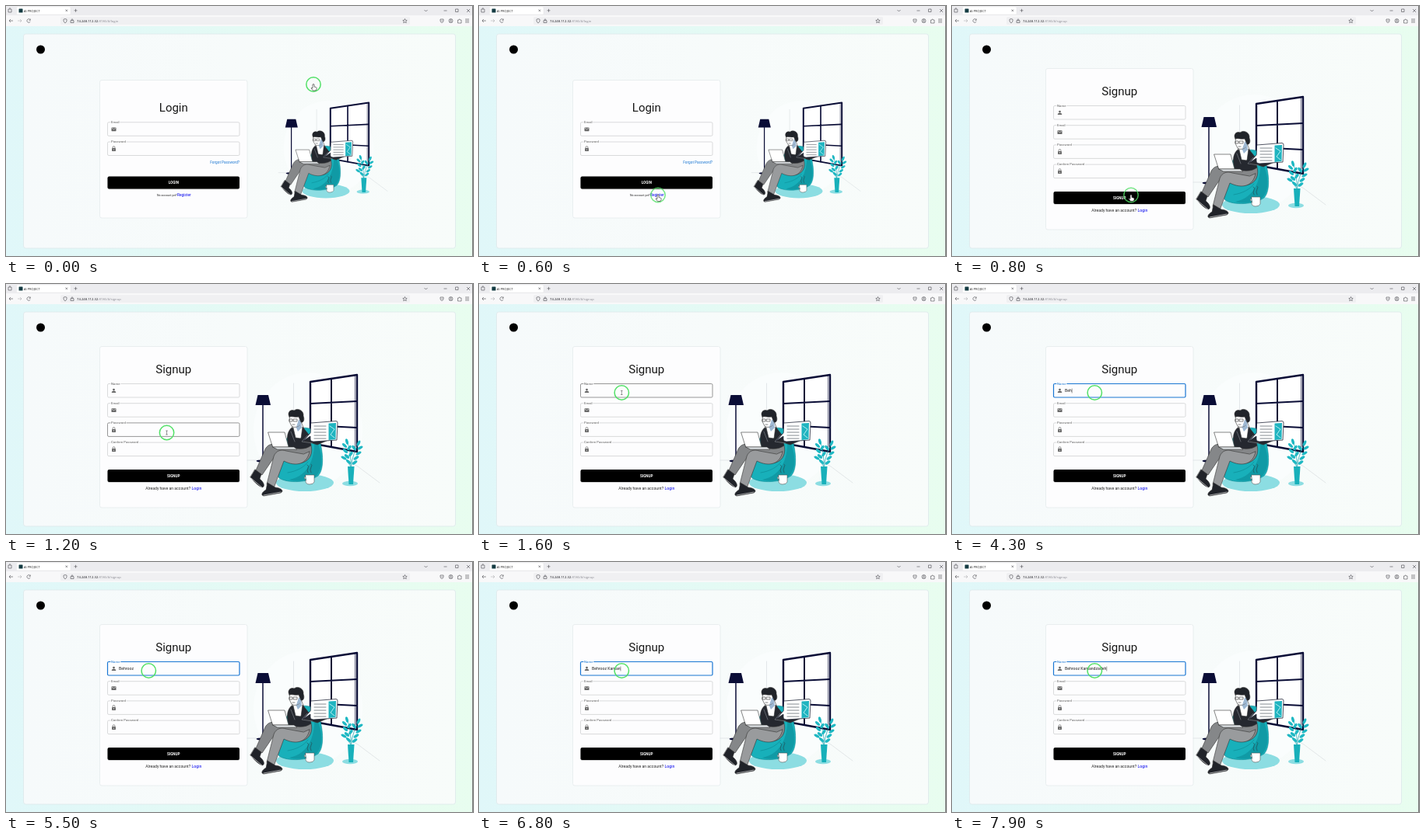
Write an HTML page that moves like this. It is 600x322 px and loops after 8000 ms.

```html
<!DOCTYPE html>
<html lang="en">
<head>
<meta charset="utf-8">
<title>Signup</title>
<style>
  html, body { margin: 0; height: 100%; overflow: hidden; }
  svg { display: block; width: 100vw; height: 100vh; }
  text { font-family: Roboto, sans-serif; white-space: pre; }
  .chrome text { font-family: "Open Sans", sans-serif; }
  .icon { fill: none; stroke: #55555c; stroke-width: .65; }
  .label { font-size: 4.3px; fill: #5c5c5c; stroke: #fdfdfe; stroke-width: 2px; paint-order: stroke; }
  .art { stroke-linejoin: round; stroke-linecap: round; }
</style>
</head>
<body>
<svg viewBox="0 0 600 322">
  <defs>
    <linearGradient id="sky"><stop stop-color="#e0f7f9"/><stop offset="1" stop-color="#e8fdef"/></linearGradient>
    <linearGradient id="panel"><stop stop-color="#f6fafb"/><stop offset="1" stop-color="#f8fcfa"/></linearGradient>

    <g id="mail"><rect x="-3" y="-2.400" width="6" height="4.800" rx=".6" fill="#666"/><path d="M-2.400-1.500L0 .1 2.400-1.500" fill="none" stroke="#fff" stroke-width=".6"/></g>
    <g id="lock"><rect x="-2.400" y="-1" width="4.800" height="4" rx=".5" fill="#666"/><path d="M-1.400-1v-1a1.400 1.400 0 0 1 2.800 0v1" fill="none" stroke="#666" stroke-width=".7"/><circle cy="1" r=".6" fill="#fff"/></g>
    <g id="person" fill="#666"><circle cy="-1.400" r="1.400"/><path d="M-2.700 2.600v-.8c0-2.200 5.400-2.200 5.400 0v.8z"/></g>

    <g id="scene" class="art">
      <ellipse cx="388" cy="188" rx="70" ry="74" fill="#fafdfd"/>
      <path d="M369.500 128V182M310 227H340M430 222L452 235L480 256" fill="none" stroke="#d3d9dc" stroke-width=".6"/>
      <ellipse cx="384" cy="256" rx="37" ry="11" fill="#8cdde2"/>
      <ellipse cx="442" cy="257" rx="10" ry="3.200" fill="#8cdde2"/>

      <g fill="#fff" stroke="#0a0d36">
        <path d="M391 126L451 117V216L391 205Z" stroke-width="2.400"/>
        <path d="M418 122V210M391 154L451 151M391 182L451 185" stroke-width="2"/>
        <path d="M448.500 118V215" stroke-width=".6"/>
      </g>

      <path d="M323.500 143H337L340 156H320.500Z" fill="#0a0d36"/>
      <path d="M330 156V228" stroke="#0a0d36" stroke-width="1.500"/>
      <ellipse cx="330" cy="228" rx="8.500" ry="1.600" fill="#0a0d36"/>

      <path d="M360 200C372 182 393 180 401 196C407 211 410 238 401 247C388 256 362 257 351 250C343 240 349 214 360 200Z" fill="#18b0ba" stroke="#0c8791" stroke-width=".6"/>
      <path d="M396 196C408 216 408 238 399 247C388 254 372 255 364 252C390 247 398 222 396 196Z" fill="#109aa5"/>
      <path d="M362 243C374 241 383 236 388 229" fill="none" stroke="#0c8791" stroke-width=".6"/>

      <g stroke="#333" stroke-width=".6">
        <path d="M392 208C395 220 389 230 376 231L348 218L329 246L321 240L332 215C335 207 341 205 347 207L373 211Z" fill="#858789"/>
        <path d="M390 216C387 232 373 236 357 228L344 263L335 258L344 222C347 214 354 213 360 215L382 219Z" fill="#999b9d"/>
        <path d="M320 239L328 245L326 251C332 256 333 261 329 262C322 259 318 253 314 249Z" fill="#202329"/>
        <path d="M336 256L346 262C355 263 357 267 353 269L331 273C327 272 329 268 334 265Z" fill="#202329"/>
        <path d="M315 250L329 262M331 272L353 268" stroke="#fff"/>
        <path d="M369 180L379 177L385 192L374 204L364 197Z" fill="#fff"/>
        <path d="M372 183L379 177L380 185L375 190Z" fill="#9db8d3" stroke="none"/>
        <path d="M366 186C360 192 361 202 363 209C374 214 386 213 392 208L389 194L381 184L379 199L372 198L369 185Z" fill="#25282f"/>
        <path d="M388 195L400 200L417 195L419 199L400 207L383 202Z" fill="#25282f"/>
        <path d="M366 190L371 203M387 195L380 203L394 205" fill="none" stroke="#868b93"/>
        <path d="M415 195L421 192L423 196L418 200Z" fill="#fff"/>
        <path d="M337 191H358L363 210H343Z" fill="#fff"/>
        <path d="M343 210H370L374 213H349Z" fill="#e2e6e9"/>
        <path d="M365 170L378 169L380 178C377 184 371 186 367 183L364 177Z" fill="#fff"/>
        <path d="M376 175L380 174L379 181L373 184Z" fill="#9db8d3" stroke="none"/>
        <path d="M364 171C361 166 365 161 370 163C375 159 383 163 382 170C384 175 382 179 379 178L376 171C371 172 368 170 364 171Z" fill="#202329"/>
        <path d="M364.500 174H368V177H364.500ZM369.500 174H374V177H369.500ZM368 181H371" fill="none"/>
      </g>

      <path d="M392 179L424 176.500Q426 176.500 426 179L425 201L395 203Q391 203 391 200V196L382 202L391 192Z" fill="#fff" stroke="#252a3c" stroke-width=".8"/>
      <path d="M414.500 179.500L424 179L423.500 200L414.500 201Z" fill="#20b4c0"/>
      <path d="M396 183H411M396 187H411M396 191H411M396 195H411M396 199H411" stroke="#777d84" stroke-width=".9"/>
      <path d="M416 183L422 187L417 194L422 198" stroke="#d9fbfc" fill="none" stroke-width=".8"/>

      <path d="M385 246H396V255Q395 258 390 258Q385 258 385 254ZM385 248Q381 249 386 253" fill="#fff" stroke="#555" stroke-width=".6"/>
      <path d="M388 243Q386 240 388 237T387 233M392 243Q390 239 392 236T392 232" fill="none" stroke="#27424a" stroke-width=".6"/>

      <path d="M443 236Q444 218 438 202M443 236Q446 217 453 206M442 234Q438 225 433 223" fill="none" stroke="#149fab" stroke-width=".7"/>
      <g id="leaves" fill="#1fb8c3"></g>
      <path d="M439 235H447.500L446 258H440.500Z" fill="#18b0ba"/>
    </g>
  </defs>

  <rect y="26" width="600" height="296" fill="url(#sky)"/>
  <rect x="22.500" y="36" width="555" height="276" rx="3" fill="url(#panel)" stroke="#dce8ea" stroke-width=".8"/>
  <circle cx="44.500" cy="56" r="5.500"/>
  <g id="login"></g>
  <g id="signup"></g>

  <g class="chrome">
    <rect width="600" height="12" fill="#ececef"/>
    <rect y="12" width="600" height="14" fill="#f8f8f9"/>
    <rect x="13.500" y="1" width="69.500" height="10" rx="1.500" fill="#fff" stroke="#ddd" stroke-width=".3"/>
    <rect x="70" y="14" width="449" height="10" rx="1.500" fill="#f0f0f2"/>
    <rect x="16.500" y="3.500" width="5" height="5" rx=".6" fill="#153c43"/>
    <text x="23" y="7.500" font-size="4" fill="#222">AI PROJECT</text>
    <path class="icon" d="M3 4H7V8H3ZM4 3H6M76.500 4.500L79 7M79 4.500L76.500 7M87.500 5.800H91.500M89.500 3.800V7.800M537.500 5L539.500 7L541.500 5M562.500 6H566.500M577.500 4H581V7.500H577.500ZM592 4L596 8M596 4L592 8"/>
    <path class="icon" opacity=".4" d="M15 19H20M18 17L20 19L18 21"/>
    <path class="icon" d="M4 19H9M6 17L4 19L6 21M31 17.500A2.300 2.300 0 1 0 31.300 20M31.300 16.500V18.300H29.500M76 16.500L78 17.200V19Q77.700 21 76 22Q74.300 21 74 19V17.200ZM83 18.800H87V21.500H83ZM84 18.800V17.500Q85 16 86 17.500V18.800"/>
    <path class="icon" d="M512.500 16.500L513.300 18.300L515.200 18.500L513.800 19.800L514.200 21.700L512.500 20.700L510.800 21.700L511.200 19.800L509.800 18.500L511.700 18.300ZM558 17H562V19Q562 21 560 21.500Q558 21 558 19ZM559 18.500L560 19.500L561 18.500M569.800 21Q571.500 18.800 573.200 21M580.500 18H582Q582.500 15.500 583.500 18H585V22H580.500ZM590 17H595M590 19H595M590 21H595"/>
    <circle class="icon" cx="571.500" cy="19" r="2.500"/>
    <circle class="icon" cx="571.500" cy="18.300" r=".8"/>
    <text x="91" y="20.700" font-size="4.200" fill="#16161d">74.248.112.32<tspan id="path" fill="#8c8c94"></tspan></text>
  </g>
  <path d="M599.500 0V322" stroke="#777"/>

  <g id="pointer">
    <circle id="ring" r="9.200" fill="none" stroke="#52e067" stroke-width="1.500"/>
    <path id="hand" d="M-1 0Q0-1 1 0V3L3.500 3.700Q4.500 4 4 6L3 8H-.5L-3 4.800Q-2.500 3.800-1 5Z" fill="#fff" stroke="#222" stroke-width=".6"/>
    <path id="beam" d="M-1.300-2.500H1.300M0-2.500V2.500M-1.300 2.500H1.300" stroke="#555" stroke-width=".6"/>
  </g>
</svg>

<script>
const $ = id => document.getElementById(id);
const LOOP = 8000, SWITCH = 650, FOCUS = 1900;
const FULL_NAME = "Behrooz Kamandzadeh";
const KEY_TIMES = [3900, 4100, 4300, 4400, 4500, 4700, 4800, 5800, 6000, 6300,
                   6400, 6600, 6800, 7200, 7500, 7600, 7700, 7800, 7900];

$("leaves").innerHTML = [[438,203,-15],[435,208,-45],[441,211,35],[436,215,-50],[443,219,35],[438,222,-50],
  [453,205,25],[455,211,60],[447,211,-35],[453,218,60],[450,224,55],[434,224,-60],[440,229,-45],[448,230,55]]
  .map(([x, y, a]) => `<ellipse rx="1.8" ry="3.8" transform="translate(${x} ${y}) rotate(${a})"/>`).join("");

const card = (y, h, title, titleY) => `
  <rect x="120.5" y="${y}" width="189.5" height="${h}" rx="2.5" fill="#fdfdfe" stroke="#e5ebed" stroke-width=".8"/>
  <text x="215.3" y="${titleY}" font-size="15" text-anchor="middle" fill="#171717">${title}</text>`;

const field = (y, label, icon) => `
  <rect class="box" x="130.5" y="${y}" width="169.5" height="17.5" rx="1.5" fill="none" stroke="#cbcccd" stroke-width=".7"/>
  <text class="label" x="135" y="${y + 1.3}">${label}</text>
  <use href="#${icon}" x="138.5" y="${y + 9}"/>`;

const button = (y, label) => `
  <rect x="130.5" y="${y + .7}" width="169.5" height="16" rx="2" opacity=".2"/>
  <rect x="130.5" y="${y}" width="169.5" height="16" rx="2"/>
  <text x="215.3" y="${y + 9.6}" font-size="4.6" font-weight="700" text-anchor="middle" fill="#fff">${label}</text>`;

$("login").innerHTML = card(95.5, 177.5, "Login", 136)
  + field(149.8, "Email", "mail") + field(175, "Password", "lock")
  + `<text x="300" y="203" font-size="4.7" text-anchor="end" fill="#1976d2">Forgot Password?</text>`
  + button(219.5, "LOGIN")
  + `<text x="194" y="244.5" font-size="3.6" fill="#222">No account yet?</text>
     <text x="220" y="244.8" font-size="4.8" fill="#0000ee">Register</text>
     <use href="#scene" transform="translate(95 28.5) scale(.823 .82)"/>`;

$("signup").innerHTML = card(80.5, 207.5, "Signup", 115)
  + field(128.5, "Name", "person") + field(153.7, "Email", "mail")
  + field(178.9, "Password", "lock") + field(204.1, "Confirm Password", "lock")
  + button(239, "SIGNUP")
  + `<text x="179.3" y="265.3" font-size="5.1" fill="#222">Already have an account?</text>
     <text x="238.5" y="265.3" font-size="5.2" fill="#0000ee">Login</text>
     <text id="typed" x="145" y="139.2" font-size="5.2" fill="#222"></text>
     <path id="caret" d="M0 134.5V140.5" stroke="#333" stroke-width=".5"/>
     <use href="#scene"/>`;

const boxes = [...$("signup").querySelectorAll(".box")];
const nameLabel = $("signup").querySelector(".label");
const show = (el, on) => el.setAttribute("visibility", on ? "visible" : "hidden");
const ease = (t, from, to) => {
  const p = Math.min(1, Math.max(0, (t - from) / (to - from)));
  return p * p * (3 - 2 * p);
};

function draw(t) {
  const onSignup = t >= SWITCH, focused = t >= FOCUS;
  $("login").style.display = onSignup ? "none" : "";
  $("signup").style.display = onSignup ? "" : "none";
  $("path").textContent = ":8186/#/" + (onSignup ? "signup" : "login");

  const toLink = ease(t, 50, 550), toField = ease(t, 900, 1500);
  const x = 395 - 165 * toLink - 46.7 * toField;
  const y = 101 + 142.5 * toLink - 103.5 * toField;
  $("pointer").setAttribute("transform", `translate(${x} ${y})`);
  $("ring").setAttribute("opacity", t > 550 && t < 950 ? .8 : 1);
  show($("hand"), t < 1000);
  show($("beam"), t >= 1000 && t < KEY_TIMES[0]);

  boxes.forEach((box, i) => {
    const top = 128.5 + 25.2 * i, hovered = y > top && y < top + 17.5;
    const active = focused && i === 0;
    box.setAttribute("stroke", active ? "#1976d2" : hovered ? "#6b6b6b" : "#cbcccd");
    box.setAttribute("stroke-width", active ? 1.2 : .7);
  });
  nameLabel.style.fill = focused ? "#1976d2" : "";

  const count = KEY_TIMES.filter(k => k <= t).length;
  const typed = $("typed");
  typed.textContent = FULL_NAME.slice(0, count);
  const lastInput = count ? KEY_TIMES[count - 1] : FOCUS;
  const caretX = 145.3 + (count ? typed.getComputedTextLength() : 0);
  $("caret").setAttribute("transform", `translate(${caretX} 0)`);
  $("caret").setAttribute("opacity", focused && (t - lastInput) % 1000 < 500 ? 1 : 0);
}

function tick() {
  draw(performance.now() % LOOP);
  requestAnimationFrame(tick);
}
tick();
</script>
</body>
</html>
```
